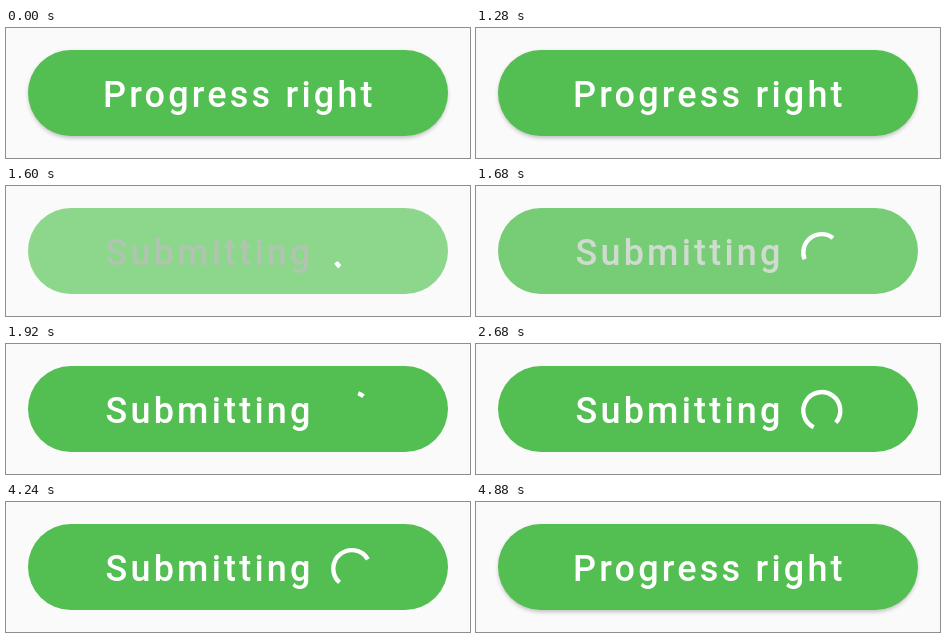
Recreate the animation shown at these times as an HTML page. Size 464 by 130 pixels, loop 5240 ms.

```html
<!DOCTYPE html>
<html lang="en">
<head>
<meta charset="utf-8">
<title>Progress button</title>
<style>
  html, body { margin: 0; width: 100%; height: 100%; overflow: hidden; background: #fafafa; }
  svg { display: block; width: 464px; height: 130px; }
  text { font: 500 36px Roboto, Arial, sans-serif; letter-spacing: 3.2px; }
</style>
</head>
<body>
<svg viewBox="0 0 464 130">
  <defs>
    <filter id="blur" x="-10%" y="-30%" width="120%" height="160%">
      <feGaussianBlur stdDeviation="2"/>
    </filter>
  </defs>
  <rect id="shadow" x="22.5" y="24" width="419" height="86" rx="43" fill="#000" filter="url(#blur)"/>
  <rect id="pill" x="22" y="22" width="420" height="86" rx="43"/>
  <text id="label" y="79"></text>
  <path id="arc" fill="none" stroke="#fff" stroke-width="4.4"/>
</svg>
<script>
const LOOP = 5240, SPEED = 1.992 / 1000;
const START = 1500, RESTART = 1905, END = 4620;
const CX = 345.8, CY = 66.6, R = 18.5;
const MIN_ARC = 18, MAX_ARC = 288;
const GREEN = [83, 190, 82], PALE = [140, 215, 140];
const WHITE = [255, 255, 255], GRAY = [176, 196, 176];

const [shadow, pill, label, arc] =
  ['shadow', 'pill', 'label', 'arc'].map(id => document.getElementById(id));

const clamp = v => Math.min(1, Math.max(0, v));
const smooth = v => v * v * (3 - 2 * v);
const ramp = (t, a, b) => smooth(clamp((t - a) / (b - a)));
const mix = (a, b, k) => `rgb(${a.map((v, i) => Math.round(v + (b[i] - v) * k))})`;

// cubic-bezier(.35, 0, .25, 1)
function ease(x) {
  let lo = 0, hi = 1;
  for (let i = 0; i < 24; i++) {
    const u = (lo + hi) / 2, v = 1 - u;
    if (1.05 * v * v * u + 0.75 * v * u * u + u ** 3 < x) lo = u; else hi = u;
  }
  return smooth((lo + hi) / 2);
}

function point(deg) {
  const a = deg * Math.PI / 180;
  return `${(CX + R * Math.cos(a)).toFixed(2)} ${(CY + R * Math.sin(a)).toFixed(2)}`;
}

// Grows at the head for half a second, then the tail catches up; s is in seconds.
function arcPath(s, turn) {
  const cycle = Math.floor(s), phase = s - cycle;
  const growing = phase < 0.5;
  const k = ease(growing ? phase * 2 : phase * 2 - 1);
  const length = MIN_ARC + (MAX_ARC - MIN_ARC) * (growing ? k : 1 - k);
  const base = turn - 90 - 90 * cycle + 180 * s;
  const from = growing ? base : base + MAX_ARC - length;
  return `M${point(from)}A${R} ${R} 0 ${length > 180 ? 1 : 0} 1 ${point(from + length)}`;
}

function draw(t) {
  const busy = t >= START && t < END;
  const dip = ramp(t, 1440, 1600) * (1 - ramp(t, 1600, 1790));

  pill.setAttribute('fill', mix(GREEN, PALE, dip));
  shadow.setAttribute('opacity', 0.24 * (1 - ramp(t, 1400, 1580) + ramp(t, 4620, 4860)));
  label.textContent = busy ? 'Submitting' : 'Progress right';
  label.setAttribute('x', busy ? 99.5 : 97);
  label.setAttribute('fill', mix(WHITE, GRAY, dip));

  arc.style.display = busy ? '' : 'none';
  if (busy) {
    arc.setAttribute('d', t < RESTART
      ? arcPath(2 + (t - 1595) * SPEED, 38)
      : arcPath(Math.max(0, t - 1912) * SPEED, 17));
  }
}

const begin = performance.now();
function tick() {
  draw((performance.now() - begin) % LOOP);
  requestAnimationFrame(tick);
}
tick();
</script>
</body>
</html>
```
